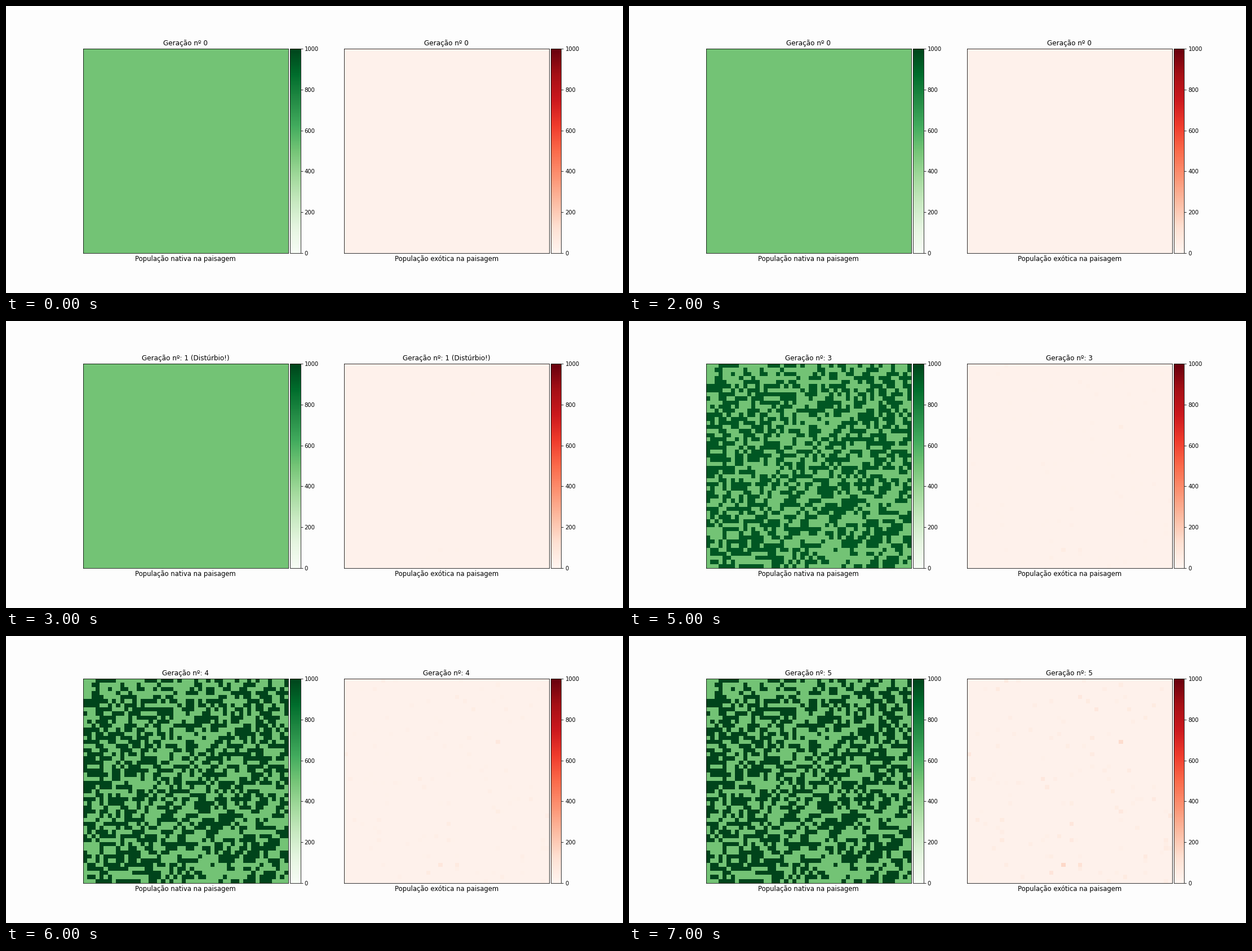
Recreate the animation shown at these times as a matplotlib script. Size 1095 px wide and 511 px high, loop 8 s.

```python
import numpy as np
import matplotlib.pyplot as plt
from matplotlib.animation import FuncAnimation
from mpl_toolkits.axes_grid1 import make_axes_locatable

SIZE = 50
CAPACITY = 1000
HOLD = 2          # extra seconds spent on generation 0
FRAMES = 8
INVADED = 110     # cells reached by the exotic species
FLOOR = 20        # slight tint of cells without exotics

plt.rcParams.update({"font.family": "DejaVu Sans", "font.size": 10})
rng = np.random.default_rng(7)


def make_habitat():
    """Even mix of cells with slightly stretched horizontal runs."""
    flips = rng.random((SIZE, SIZE)) < 0.45
    flips[:, 0] = rng.random(SIZE) < 0.5
    return np.cumsum(flips, axis=1) % 2 == 1


def make_invasion():
    """Exotic population reached at generation 5."""
    peak = np.zeros(SIZE * SIZE)
    cells = rng.choice(peak.size, INVADED, replace=False)
    peak[cells] = np.clip(rng.lognormal(3.2, 0.6, INVADED), 5, 70)
    peak = peak.reshape(SIZE, SIZE)
    # The three strongest colonies
    peak[45, 23], peak[15, 37], peak[45, 27] = 130, 115, 90
    return peak


peak = make_invasion()
habitat = make_habitat() & (peak == 0)


def native_population(gen):
    level = CAPACITY / 2
    for _ in range(gen - 1):
        level += level * (1 - level / CAPACITY)
    return np.where(habitat, level, CAPACITY / 2)


def exotic_population(gen):
    grown = np.round(peak * 2.0 ** (gen - 5)) if gen else np.zeros_like(peak)
    return FLOOR + grown


def title(gen):
    if gen == 0:
        return "Geração nº 0"
    return f"Geração nº: {gen}" + (" (Distúrbio!)" if gen == 1 else "")


def make_panel(ax, cmap, label):
    image = ax.imshow(np.zeros((SIZE, SIZE)), cmap=cmap, vmin=0, vmax=CAPACITY,
                      interpolation="nearest")
    ax.set_xticks([])
    ax.set_yticks([])
    ax.set_xlabel(label, fontsize=11.6)
    ax.set_title(title(0), fontsize=12)
    cax = make_axes_locatable(ax).append_axes("right", size="5%", pad=0.05)
    fig.colorbar(image, cax=cax, ticks=range(0, CAPACITY + 1, 200))
    return image


fig, axes = plt.subplots(1, 2, figsize=(1095 / 72, 511 / 72), dpi=72,
                         facecolor="#fdfdfd")
native = make_panel(axes[0], "Greens", "População nativa na paisagem")
exotic = make_panel(axes[1], "Reds", "População exótica na paisagem")


def update(frame):
    gen = max(0, frame - HOLD)
    native.set_data(native_population(gen))
    exotic.set_data(exotic_population(gen))
    for ax in axes:
        ax.set_title(title(gen), fontsize=12)
    return native, exotic


anim = FuncAnimation(fig, update, frames=FRAMES, interval=1000,
                     init_func=lambda: update(0), repeat=True, repeat_delay=0)
plt.show()
```
